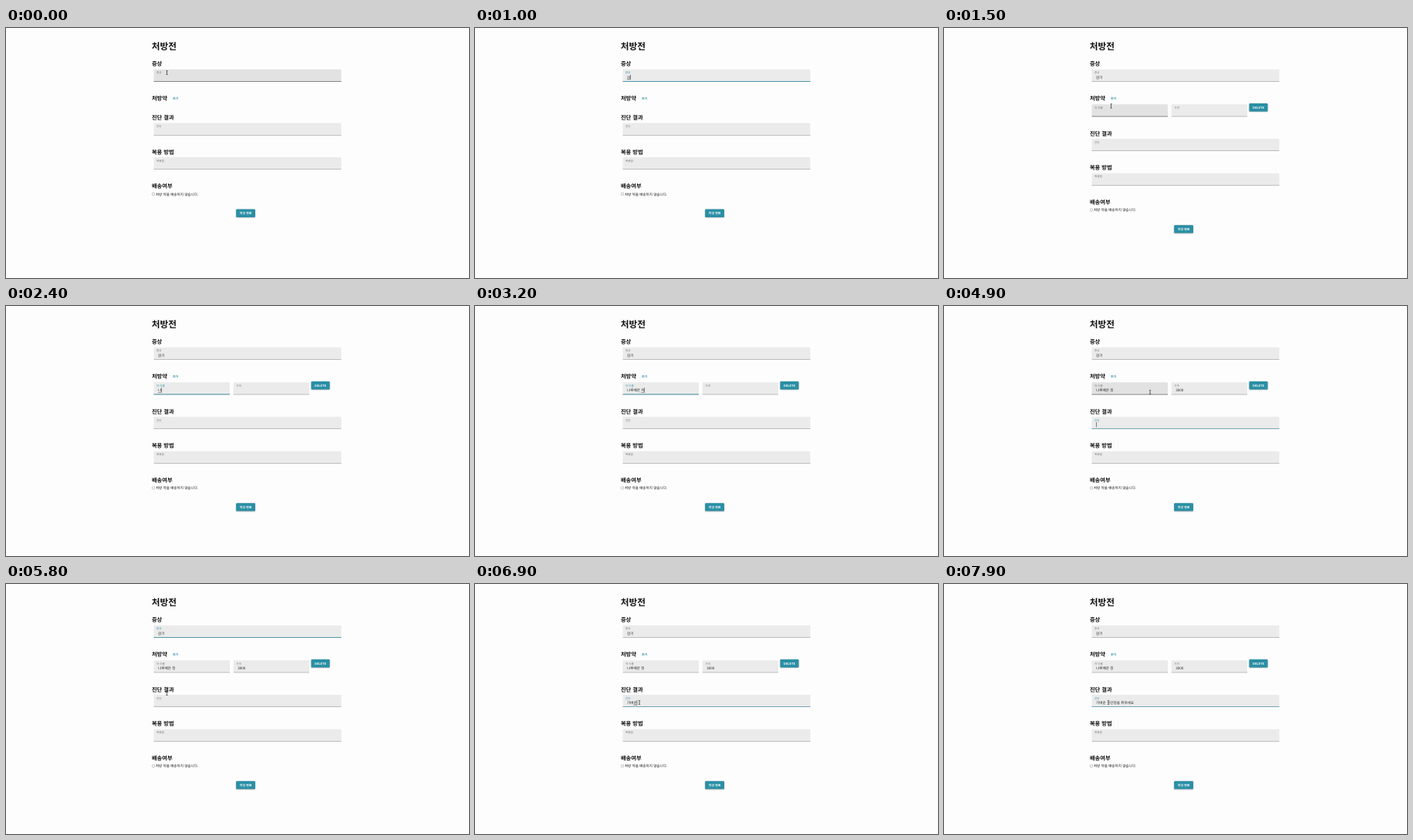
Animation of 600x325 px, one loop 8 s. Source, as an HTML page with a canvas:

```html
<!DOCTYPE html>
<html lang="ko">
<head>
<meta charset="utf-8">
<style>
html, body { margin: 0; width: 100%; height: 100%; overflow: hidden; background: #fefdfe; }
canvas { display: block; width: 600px; height: 325px; }
</style>
</head>
<body>
<canvas id="stage"></canvas>
<script>
const LOOP = 8000, BLINK = 200, ROW_ADDED = 1350, ROW_SHIFT = 20.7;
const TEAL = '#2a8fa5', INK = '#111';
const FONT = '"Noto Sans CJK KR", "Noto Sans CJK", "Noto Sans", sans-serif';

const canvas = document.getElementById('stage');
const ctx = canvas.getContext('2d');
const ratio = window.devicePixelRatio || 1;
canvas.width = 600 * ratio;
canvas.height = 325 * ratio;
ctx.textRendering = 'geometricPrecision';

// Which field has the focus, and since when
const focusLog = [
  [200, 'symptom'], [ROW_ADDED, null], [1600, 'drug'], [3310, 'price'],
  [4000, 'diagnosis'], [5200, 'symptom'], [5950, 'diagnosis']
];

// Pointer stops: time, x, y
const stops = [
  [0, 208.5, 58], [1200, 208.5, 58], [1330, 219, 92], [1400, 219, 92],
  [1580, 215, 108], [3550, 215, 108], [3880, 234.5, 150], [4050, 234.5, 150],
  [4450, 545, 150], [4650, 545, 150], [4880, 267, 112], [4940, 267, 112],
  [5150, 208.5, 62], [5500, 208.5, 62], [5780, 208.5, 142], [5830, 208.5, 142],
  [5940, 212, 152], [6100, 460, 164], [6250, 460, 164], [6550, 213, 154]
];
const pointerHidden = [[750, 1200], [2250, 3550]];

// Splits a Hangul syllable into the states seen while it is composed
function composing(char) {
  const code = char.charCodeAt(0) - 0xac00;
  if (code < 0 || code > 11171) return [char];
  const leads = 'ㄱㄲㄴㄷㄸㄹㅁㅂㅃㅅㅆㅇㅈㅉㅊㅋㅌㅍㅎ';
  const open = String.fromCharCode(0xac00 + code - code % 28);
  const states = [leads[Math.floor(code / 588)], open];
  if (code % 28) states.push(char);
  return states;
}

function keystrokes(text) {
  const states = [];
  let done = '';
  for (const char of text) {
    for (const part of composing(char)) states.push(done + part);
    done += char;
  }
  return states;
}

const entry = (text, start, step) => ({ states: keystrokes(text), start, step });
const entries = {
  symptom: entry('감기', 790, 100),
  drug: entry('나루베온 정', 2300, 80),
  price: entry('3000', 3350, 50),
  diagnosis: entry('가벼운 ㄱ안정을 취하세요', 6600, 48)
};

function typed(id, t) {
  const e = entries[id];
  if (!e || t < e.start) return { text: '', active: false };
  const i = Math.floor((t - e.start) / e.step);
  const last = e.states.length - 1;
  return { text: e.states[Math.min(i, last)], active: i < last };
}

function pointerAt(t) {
  if (pointerHidden.some(([from, to]) => t >= from && t < to)) return null;
  const next = stops.findIndex(s => s[0] > t);
  if (next < 0) return { x: stops[stops.length - 1][1], y: stops[stops.length - 1][2] };
  const [t0, x0, y0] = stops[next - 1], [t1, x1, y1] = stops[next];
  const p = (t - t0) / (t1 - t0), k = p * p * (3 - 2 * p);
  return { x: x0 + (x1 - x0) * k, y: y0 + (y1 - y0) * k };
}

function rect(x, y, w, h, color, radii = 0) {
  ctx.fillStyle = color;
  ctx.beginPath();
  ctx.roundRect(x, y, w, h, radii);
  ctx.fill();
}

// Text is placed by its left edge and vertical middle
function label(text, x, middle, size, color = INK, weight = 400, align = 'left') {
  ctx.font = `${weight} ${size}px ${FONT}`;
  ctx.textAlign = align;
  ctx.fillStyle = color;
  ctx.fillText(text, x, middle + size * 0.38);
  return ctx.measureText(text).width;
}

const heading = (text, y) => label(text, 188.9, y, 7.3, INK, 700);

function button(text, x, y, w) {
  ctx.save();
  ctx.shadowColor = 'rgba(0,0,0,.35)';
  ctx.shadowBlur = 1.5 * ratio;
  ctx.shadowOffsetY = 0.6 * ratio;
  rect(x, y, w, 10.4, TEAL, 1.2);
  ctx.restore();
  label(text, x + w / 2, y + 5.2, 3.95, '#fff', 700, 'center');
}

function field(id, name, x, y, w, scene) {
  const { t, focus, pointer } = scene;
  const focused = focus.id === id;
  const hover = !focused && pointer && pointer.x > x && pointer.x < x + w &&
    pointer.y > y && pointer.y < y + 16;
  rect(x, y, w, 16, hover ? '#e2e2e2' : '#ebebeb', [1.2, 1.2, 0, 0]);
  rect(x, y + 15.5, w, 0.5, hover ? '#222' : '#8c8c8c');
  if (focused) {
    const grow = Math.min(1, (t - focus.since) / 150);
    rect(x + w * (1 - grow) / 2, y + 15.3, w * grow, 0.7, TEAL);
  }
  label(name, x + 3.5, y + 4.3, 3.5, focused ? TEAL : '#6e6e6e');

  const { text, active } = typed(id, t);
  const left = x + 5.5, width = label(text, left, y + 10.3, 4.6, '#222');
  if (!focused) return;
  if (active && id !== 'price') {
    const before = ctx.measureText(text.slice(0, -1)).width;
    rect(left + before, y + 12.9, width - before, 0.4, '#333');
  }
  if (Math.floor((t - focus.since) / BLINK) % 2 === 0) {
    rect(left + width, y + 7, 0.5, 6.3, INK);
  }
}

function drawPointer({ x, y }) {
  const overButton = x > 214 && x < 225 && y > 88 && y < 96;
  if (x < 435 && !overButton) {
    rect(x - 0.3, y - 2.6, 0.7, 5.2, '#222');
    rect(x - 1.2, y - 2.9, 2.5, 0.5, '#222');
    rect(x - 1.2, y + 2.4, 2.5, 0.5, '#222');
    return;
  }
  ctx.beginPath();
  ctx.moveTo(x, y);
  for (const [dx, dy] of [[0, 5], [1.2, 4], [2, 5.7], [2.8, 5.3], [2, 3.7], [3.5, 3.5]]) {
    ctx.lineTo(x + dx, y + dy);
  }
  ctx.closePath();
  ctx.fillStyle = '#111';
  ctx.fill();
  ctx.strokeStyle = '#fff';
  ctx.lineWidth = 0.4;
  ctx.stroke();
}

function draw(t) {
  const focus = { id: null, since: 0 };
  for (const [since, id] of focusLog) if (t >= since) Object.assign(focus, { id, since });
  const pointer = pointerAt(t);
  const scene = { t, focus, pointer };
  const hasRow = t >= ROW_ADDED;
  const dy = hasRow ? ROW_SHIFT : 0;

  ctx.setTransform(ratio, 0, 0, ratio, 0, 0);
  rect(0, 0, 600, 325, '#fefdfe');
  label('처방전', 188.7, 24, 11.7, INK, 700);

  heading('증상', 46.3);
  field('symptom', '증상', 191.5, 53.8, 243, scene);

  heading('처방약', 91);
  label('추가', 216, 91.7, 3.9, TEAL, 700);
  if (hasRow) {
    field('drug', '약 이름', 191.5, 99.3, 98.5, scene);
    field('price', '가격', 294.7, 99.3, 98.3, scene);
    button('DELETE', 395.5, 98, 24);
  }

  heading('진단 결과', 116.3 + dy);
  field('diagnosis', '진단', 191.5, 123.4 + dy, 243, scene);

  heading('복용 방법', 160.8 + dy);
  field('dosage', '복용법', 191.5, 168 + dy, 243, scene);

  heading('배송여부', 205.5 + dy);
  ctx.strokeStyle = '#777';
  ctx.lineWidth = 0.4;
  ctx.beginPath();
  ctx.roundRect(189.4, 214.3 + dy, 3.2, 3.2, 0.6);
  ctx.stroke();
  label('처방 약을 배송하지 않습니다.', 193.9, 216 + dy, 4.55, INK, 500);

  button('작성 완료', 298.2, 235.5 + dy, 24.8);
  if (pointer) drawPointer(pointer);
}

function tick(now) {
  draw(now % LOOP);
  requestAnimationFrame(tick);
}
requestAnimationFrame(tick);
</script>
</body>
</html>
```
